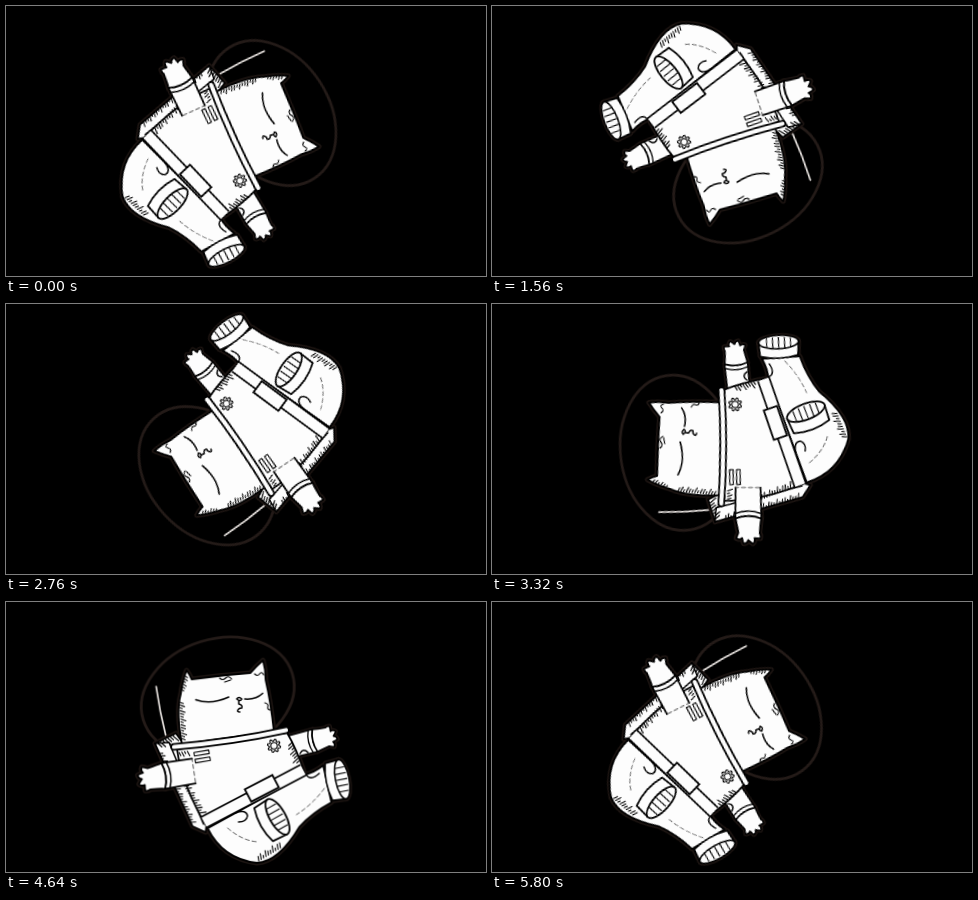
An HTML page for the animation above (5840 ms loop, 480 by 270 pixels).

```html
<!DOCTYPE html>
<html lang="en">
<head>
<meta charset="utf-8">
<title>Drifting astronaut cat</title>
<style>
  html, body { margin: 0; width: 100%; height: 100%; overflow: hidden; background: #000; }
  svg { display: block; width: 480px; height: 270px; }
  #cat {
    transform-origin: 230.4px 136.6px;
    animation: tumble 5840ms steps(146) infinite;
  }
  @keyframes tumble {
    from { transform: rotate(73.6deg); }
    to { transform: rotate(433.6deg); }
  }
  path, ellipse { stroke-linejoin: round; stroke-linecap: round; }
  .skin { fill: #fdfdfd; stroke: var(--line, #000); stroke-width: var(--weight, 1.8); }
  .halo { --line: #1d1512; --weight: 5; }
  .ink { fill: none; stroke: #000; stroke-width: 1.5; }
  .thin { fill: none; stroke: #000; stroke-width: 1.1; }
  .dash { fill: none; stroke: #333; stroke-width: .8; stroke-dasharray: 4 3; }
  .edge { fill: none; stroke: #000; }
  .fill { fill: none; stroke: #fdfdfd; }
  .glass { fill: none; stroke: #241b18; stroke-width: 2.8; }
</style>
</head>
<body>
<svg viewBox="0 0 480 270">
  <defs>
    <!-- Limbs point along +x, with the cuff or sole at the origin -->
    <g id="arm">
      <path class="skin" d="M-31 -12L0 -13Q-5 0 0 13L-31 13"/>
      <path id="paw" class="skin"/>
      <path class="ink" d="M-5 -13Q-10 0 -5 13"/>
      <path class="dash" d="M-31 -11V12"/>
    </g>
    <g id="foot">
      <path class="skin" d="M0 -20L-16 -19Q-22 0 -16 19L0 20Z"/>
      <ellipse class="skin" rx="8" ry="20"/>
      <path id="sole" class="thin"/>
    </g>

    <g id="body">
      <path class="skin" d="M170 131L149 141L186 224L199 230L205 180Z"/>
      <path class="ink" d="M149 141L163 140L197 222"/>

      <path class="skin" d="M176 142Q170 110 175 92Q177 78 181 68Q184 72 186 77Q216 73 245 71Q251 64 257.500 58.500Q260 67 260 78Q265 100 268 130Z"/>
      <path class="ink" d="M190 97.500Q205 103 223 95M239 97Q250 98 257 91.500"/>
      <path class="ink" d="M231 97q2 -3 5 0q-2 3 -5 0M233 99v3q4 1 3 4q-3 0 -4 2t2 2"/>
      <path class="thin" d="M214 76q3 3 6 0t6 1M219 80l6 -2M249 72q3 3 5 0t4 1M259 101q4 1 3 4t3 3"/>

      <use href="#arm" transform="translate(309 139) rotate(-13) scale(.88)"/>
      <path class="ink" d="M294 152q3 -6 8 -1"/>

      <path class="skin" d="M201 226L299 173Q308 171 317 164L325 201Q306 211 293 225Q272 260 250 261Q216 257 201 226Z"/>
      <path class="ink" d="M300 173Q304 180 313 172M229 211Q240 207 241 214Q240 220 232 220"/>
      <path class="dash" d="M318 187Q306 203 290 213M221 226Q236 239 251 240"/>
      <use href="#foot" transform="translate(336 178) rotate(-11) scale(.85 1)"/>
      <use href="#foot" transform="translate(271 215) rotate(-29)"/>

      <path class="skin" d="M171 147L281 131Q290 146 299 173L201 226Q176 184 171 147Z"/>
      <path class="edge" stroke-width="13.500" style="stroke-linecap:butt" d="M197.500 220L297 168.500"/>
      <path class="fill" stroke-width="10.300" style="stroke-linecap:butt" d="M197.500 220L297 168.500"/>
      <rect class="skin" x="-15.500" y="-7" width="31" height="14" transform="translate(255.500 186.500) rotate(-27)"/>

      <path class="edge" stroke-width="7.500" d="M168 144.500Q226 140 280 128.500"/>
      <path class="fill" stroke-width="4.200" d="M168 144.500Q226 140 280 128.500"/>

      <path class="thin" d="M188.500 149h15v3.500h-15zM188.500 156h15v3.500h-15z" transform="rotate(-9 196 154)"/>
      <g transform="translate(268 144)">
        <path id="gear" class="thin"/>
        <circle class="thin" r="3.200"/>
      </g>
      <path id="hatch" class="thin"/>
      <use href="#arm" transform="translate(157 173.500) rotate(172)"/>
    </g>
  </defs>

  <g id="cat">
    <ellipse class="glass" cx="212" cy="94.500" rx="78" ry="57.500" transform="rotate(-17 212 94.500)"/>
    <path d="M150.500 84Q154 110 160 134" fill="none" stroke="#e9e4e1" stroke-width="1.700"/>
    <use class="halo" href="#body"/>
    <use href="#body"/>
  </g>
</svg>
<script>
  const setPath = (id, d) => document.getElementById(id).setAttribute('d', d);
  const polar = (r, a, cx = 0) => `${cx + r * Math.cos(a)} ${r * Math.sin(a)}`;

  // Uneven strokes leaning off a line; a negative length flips the side
  function hatch(x1, y1, x2, y2, length) {
    const span = Math.hypot(x2 - x1, y2 - y1);
    const ux = (x2 - x1) / span, uy = (y2 - y1) / span;
    let d = '';
    for (let s = 0, i = 0; s <= span; s += 2.8, i++) {
      const len = length * (0.7 + 0.3 * Math.sin(i * 2.4));
      const lean = Math.abs(len) * 0.4;
      d += `M${x1 + ux * s} ${y1 + uy * s}l${uy * len + ux * lean} ${-ux * len + uy * lean}`;
    }
    return d;
  }

  function gear(teeth) {
    const points = [];
    for (let i = 0; i < teeth * 4; i++) {
      points.push(polar(i % 4 < 2 ? 6.6 : 4.9, (i + 0.5) * Math.PI / (teeth * 2)));
    }
    return `M${points.join('L')}Z`;
  }

  // Pointed fingers fanned around the palm
  function paw(fingers) {
    const step = 2.5 / fingers;
    let d = 'M0 -13Q4 -12 ' + polar(12, -1.25, 11);
    for (let i = 0; i < fingers; i++) {
      const a = -1.25 + i * step;
      d += `Q${polar(14, a + step * 0.1, 11)} ${polar(15, a + step * 0.5, 11)}`;
      d += `Q${polar(13, a + step * 0.7, 11)} ${polar(10.5, a + step, 11)}`;
    }
    return d + 'Q4 12 0 13Q-5 0 0 -13Z';
  }

  function sole() {
    let d = '';
    for (let y = -12; y <= 12; y += 6) {
      const half = 8 * Math.sqrt(1 - (y / 20) ** 2);
      d += `M${-half} ${y}H${half * 0.7}`;
    }
    return d;
  }

  setPath('gear', gear(8));
  setPath('paw', paw(4));
  setPath('sole', sole());
  setPath('hatch', [
    [174, 100, 176, 138, 5],
    [180, 74, 176, 90, 3],
    [152, 141, 168, 133, -7],
    [153, 151, 184, 220, 5],
    [178, 184, 194, 212, 6],
    [173, 150, 182, 149, -5],
    [286, 141, 293, 160, -6],
    [252, 259, 274, 246, 6]
  ].map(edge => hatch(...edge)).join(''));
</script>
</body>
</html>
```
